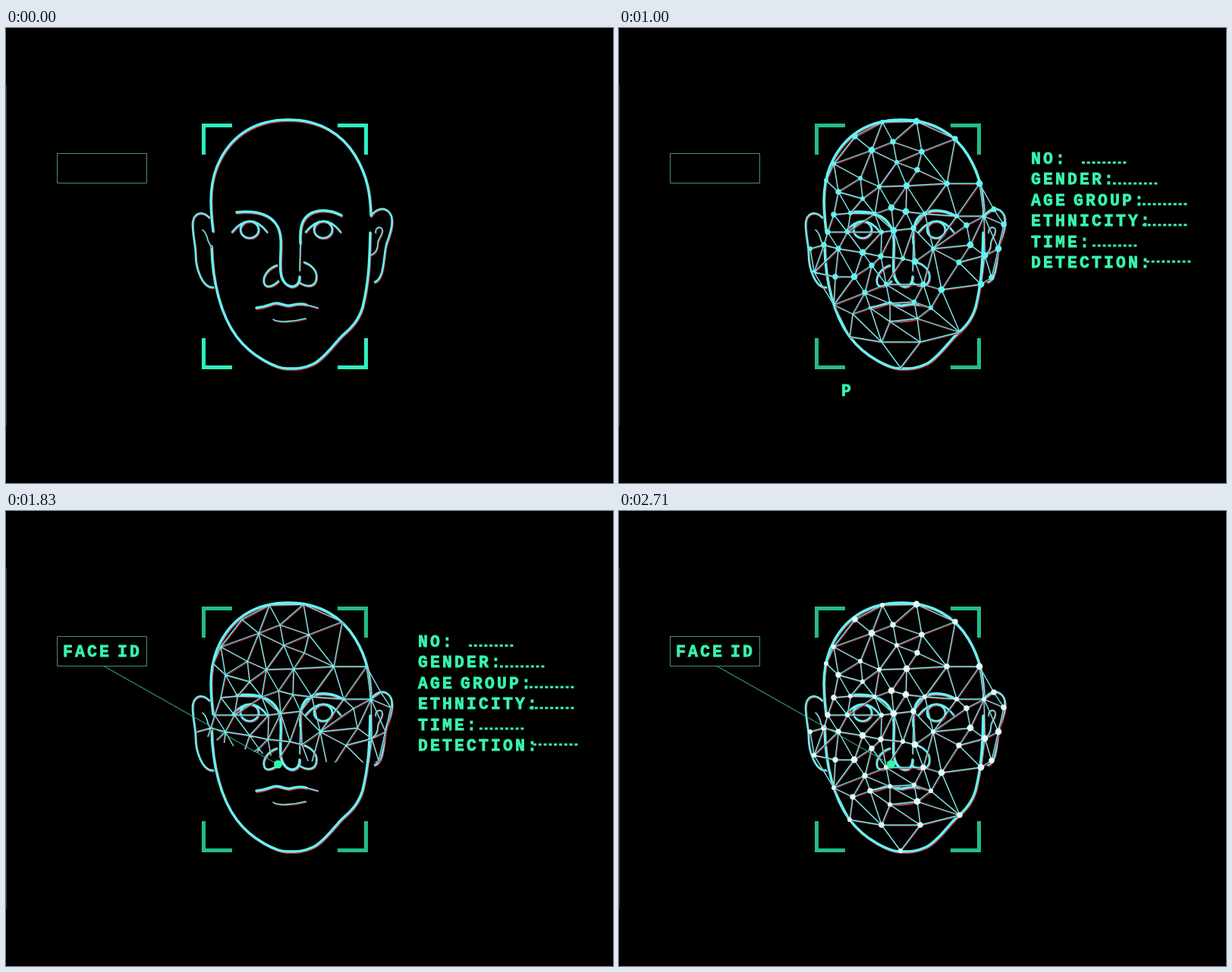
Write an HTML page with a canvas that moves like this. It is 800 px wide and 600 px high and loops after 2790 ms.

```html
<!DOCTYPE html>
<html lang="en">
<head>
<meta charset="utf-8">
<title>Face scan</title>
<style>
  html, body { margin: 0; height: 100%; overflow: hidden; background: #000; }
  canvas { display: block; }
</style>
</head>
<body>
<canvas id="stage" width="800" height="600"></canvas>
<script>
const ctx = document.getElementById('stage').getContext('2d');
const LOOP = 2790, LAST_FRAME = 65;
const CYAN = '#62f4f2', RED = '#b52a3c', GREEN = '#38f5ac';

// Face curves, grouped by line weight
const eye = (x, y) => `M${x - 23} ${y + 3} q24 -29 46 0 M${x - 12} ${y} a12 11 0 1 0 24 0 a12 11 0 1 0 -24 0`;
const bold = new Path2D(`
  M273 268 C268 230 268 200 283 172 C300 140 330 121 372 121 S443 140 460 168 S480 220 481 247
  M480 270 C479 310 478 335 470 368 C464 388 452 398 444 405 S420 436 405 443 S382 449 370 449
  S325 435 304 407 S272 335 271 288
  M304 243 C330 240 350 246 358 262 S360 300 362 322 S387 348 387 328
  M442 247 C425 238 400 237 391 256 Q387 266 388 284
  M330 369 C345 368 350 362 358 363 S368 367 374 366 S388 362 396 365`);
const medium = new Path2D(`
  M268 250 C258 240 245 243 246 262 S250 285 250 300 S258 343 273 342
  M481 248 C486 240 497 234 505 243 S507 270 502 283 S500 330 486 335
  M357 313 C345 317 338 328 340 336 S352 341 359 334
  M393 309 C402 312 411 320 409 331 S397 342 387 336` + eye(321, 266) + eye(418, 266));
const fine = new Path2D(`
  M259 266 Q264 270 266 280 L270 288 M388 284 L387 320
  M487 270 C486 262 496 260 496 267 S490 278 490 284 S488 297 480 300
  M396 365 L411 369 M352 384 C358 389 380 387 395 383`);

// Landmarks on the face; the mesh between them is computed
const landmarks = `
  347,124 392,123 311,143 443,146 361,150 333,161 399,163 283,179 366,177 393,187
  318,198 273,201 343,209 379,208 432,205 475,205 289,216 321,225 359,237 378,242
  403,245 445,248 283,246 305,244 337,245 458,260 481,248 494,239 388,264 362,267
  346,269 301,269 275,269 270,286 252,291 289,291 321,296 345,301 374,304 390,308
  414,291 463,286 448,309 333,313 310,328 285,328 257,322 324,349 352,338 401,338
  425,345 477,338 491,329 500,291 507,259 482,300 283,365 308,377 331,369 357,363
  389,361 411,369 357,387 393,383 304,407 346,414 397,414 449,401 371,448`
  .trim().split(/\s+/).map(pair => pair.split(',').map(Number));

const distance = (a, b) => Math.hypot(a[0] - b[0], a[1] - b[1]);
const side = (a, b, p) => (b[0] - a[0]) * (p[1] - a[1]) - (b[1] - a[1]) * (p[0] - a[0]);
const cross = ([a, b], [c, d]) =>
  side(a, b, c) * side(a, b, d) < 0 && side(c, d, a) * side(c, d, b) < 0;

// Joins neighbours, shortest first, without crossings or detours past a third point
function connect(points, maxLength, slack) {
  const pairs = points.flatMap((a, i) => points.slice(i + 1).map(b => [a, b]))
    .filter(([a, b]) => distance(a, b) < maxLength)
    .sort((p, q) => distance(...p) - distance(...q));
  const edges = [];
  for (const pair of pairs) {
    const [a, b] = pair;
    const blocked = points.some(p => p !== a && p !== b &&
      distance(a, p) + distance(p, b) < slack * distance(a, b));
    if (!blocked && !edges.some(edge => cross(edge, pair))) edges.push(pair);
  }
  return edges;
}

const mesh = new Path2D(connect(landmarks, 62, 1.2).map(([a, b]) => `M${a}L${b}`).join(''));
const dots = new Path2D();
for (const [x, y] of landmarks) {
  const r = 3 + (x * 7 + y * 13) % 3 * 0.7;
  dots.moveTo(x + r, y);
  dots.arc(x, y, r, 0, 7);
}

function stroke(path, color, width) {
  ctx.strokeStyle = color;
  ctx.lineWidth = width;
  ctx.stroke(path);
}

// Cyan line over a red fringe
function glow(path, width) {
  ctx.save();
  ctx.translate(0.8, 1.2);
  stroke(path, RED, width);
  ctx.restore();
  stroke(path, CYAN, width);
}

// Draws only above a curved edge that moves down the face
function above(edge, draw) {
  const bend = Math.max(0, edge - 220) * 1e-5;
  ctx.save();
  ctx.beginPath();
  ctx.moveTo(800, 0);
  ctx.lineTo(0, 0);
  for (let x = 0; x <= 800; x += 20) {
    ctx.lineTo(x, edge - bend * Math.max(0, 440 - x) ** 2);
  }
  ctx.clip();
  draw();
  ctx.restore();
}

function print(text, x, y) {
  ctx.font = 'bold 21.5px "Liberation Mono", monospace';
  ctx.letterSpacing = '3.1px';
  ctx.wordSpacing = '-8px';
  ctx.fillStyle = ctx.strokeStyle = GREEN;
  ctx.lineWidth = 0.8;
  ctx.fillText(text, x, y);
  ctx.strokeText(text, x, y);
}

function drawFace() {
  glow(bold, 3.4);
  glow(medium, 2.6);
  glow(fine, 1.6);
}

function drawMesh(n, dotColor) {
  above(123 + 17.4 * n, () => {
    ctx.globalAlpha = n > 26 && n < 32 ? 0.5 : 1;
    glow(mesh, 1.3);
  });
  if (n > 12) above(120 + 34.6 * (n - 12) ** 0.803, () => {
    ctx.fillStyle = dotColor;
    ctx.fill(dots);
  });
}

function drawBrackets(phase) {
  const dim = phase > 0 && phase < 5;
  const color = phase > 10 ? '#f4faf6' : dim ? '#22be84' : '#2df0c0';
  const corners = new Path2D();
  for (const sx of [-1, 1]) {
    for (const sy of [-1, 1]) {
      const x = 367.5 + 107 * sx, y = 288 + 159.5 * sy;
      corners.moveTo(x - 37.5 * sx, y);
      corners.lineTo(x, y);
      corners.lineTo(x, y - 38.5 * sy);
    }
  }
  ctx.lineCap = 'butt';
  ctx.lineJoin = 'miter';
  stroke(corners, color, 5);
}

function drawLabel(phase) {
  const u = Math.min(1, Math.max(0, (phase - 0.56) / 9.26));
  const reach = 1 - (1 - u) ** 2;
  if (reach) stroke(new Path2D(`M128 204 l${230 * reach} ${130 * reach}`), '#43b98d', 1);
  if (phase > 5 || phase % 2 === 0) {
    stroke(new Path2D('M67.5 165.5 h118 v39 h-118 z'), '#4b8f6c', 1);
  }
  print('FACE ID'.slice(0, Math.max(0, phase - 4)), 75, 192);
  if (phase > 9) {
    ctx.beginPath();
    ctx.arc(358.5, 334, 5.5, 0, 7);
    ctx.fill();
  }
}

function drawList() {
  const rows = { 'NO:': 610, 'GENDER:': 651, 'AGE GROUP:': 690, 'ETHNICITY:': 690, 'TIME:': 624, 'DETECTION:': 695 };
  Object.entries(rows).forEach(([name, x], i) => {
    const y = 179 + 27.4 * i;
    print(name, 543, y);
    ctx.setLineDash([4, 2.8]);
    stroke(new Path2D(`M${x} ${i < 5 ? y - 1.5 : y - 8} h58.4`), GREEN, 3);
    ctx.setLineDash([]);
  });
}

function draw() {
  const time = performance.now() % LOOP;
  const frame = Math.min(LAST_FRAME, Math.floor((time + 5) * 0.024));
  const status = frame % 21, label = frame % 24, blink = frame % 16;

  ctx.fillStyle = '#000';
  ctx.fillRect(0, 0, 800, 600);
  ctx.fillStyle = '#3c3538';
  ctx.fillRect(0, 75, 1, 450);

  ctx.lineCap = ctx.lineJoin = 'round';
  drawFace();
  drawMesh(frame < 32 ? frame : frame - 32, label < 12 ? CYAN : '#e4fbfa');
  drawBrackets(status);
  drawLabel(label);
  if (status > 2) print('PROCESSING'.slice(0, status - 2), 293, 485);
  if (blink > 5 && blink < 14) drawList();
  requestAnimationFrame(draw);
}
draw();
</script>
</body>
</html>
```
